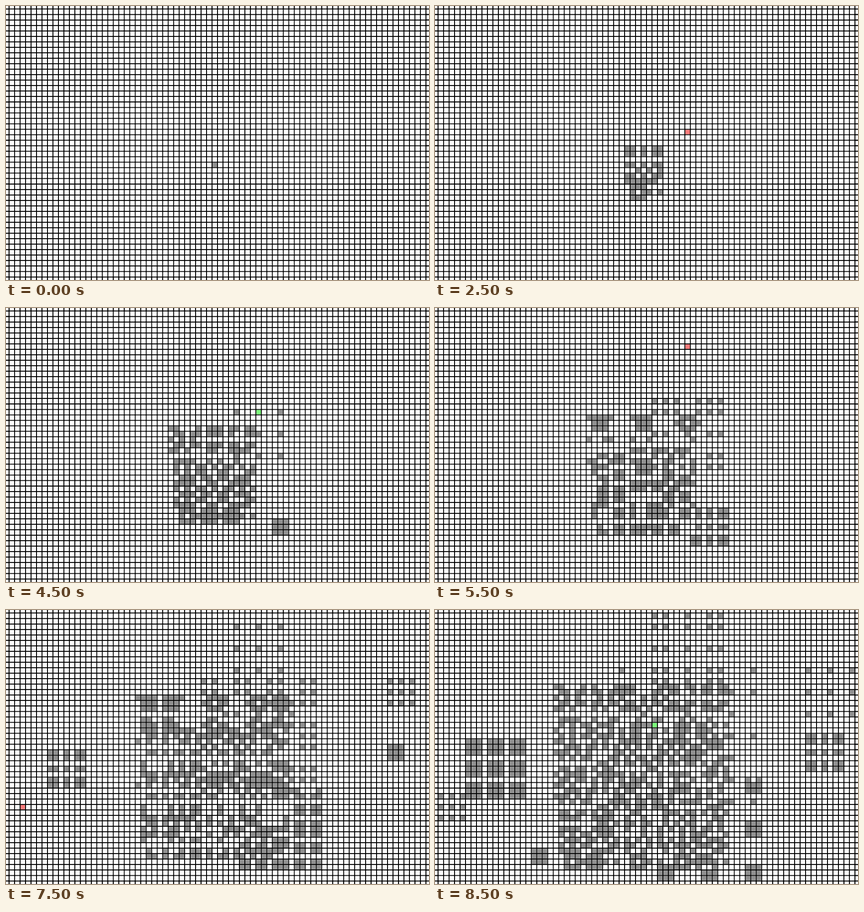
These frames come from a looping animation (928 by 603 pixels, 10000 ms). An HTML page:

```html
<!DOCTYPE html>
<html lang="en">
<head>
<meta charset="utf-8">
<title>Parity automaton with errors</title>
<style>
html, body { margin: 0; width: 100%; height: 100%; overflow: hidden; background: #fff; }
svg { display: block; width: 928px; height: 603px; }
</style>
</head>
<body>
<svg viewBox="0 0 928 603">
  <rect width="928" height="603" fill="#fff"/>
  <path id="lines" fill="none" stroke="#000" stroke-width="2.3"/>
  <path id="off" fill="#fff"/>
  <path id="on" fill="#919191"/>
  <path id="added" fill="#ff7a7a"/>
  <path id="removed" fill="#7aff7a"/>
</svg>
<script>
const W = 928, H = 603, COLS = 76, ROWS = 49;
const PITCH = 12.033, HALF_LINE = 1.13;
const LEFT = (W - COLS * PITCH) / 2, TOP = (H - ROWS * PITCH) / 2;
const LOOP = 10000, STEP = 500, LEAD = 1000;

// Column and row of the one cell flipped after each generation.
const flips = [
  [38, 31], [36, 33], [45, 22], [40, 30], [31, 23],
  [49, 39], [45, 18], [42, 36], [45, 6], [10, 28],
  [71, 14], [70, 25], [2, 35], [18, 44], [39, 20]
];

const index = (c, r) => r * COLS + c;
const lineX = c => LEFT + c * PITCH;
const lineY = r => TOP + r * PITCH;

// Each new cell is the parity of its 3 by 3 neighbourhood.
function evolve(cells) {
  const next = new Uint8Array(COLS * ROWS);
  for (let r = 0; r < ROWS; r++) {
    for (let c = 0; c < COLS; c++) {
      let sum = 0;
      for (let y = Math.max(0, r - 1); y <= Math.min(ROWS - 1, r + 1); y++) {
        for (let x = Math.max(0, c - 1); x <= Math.min(COLS - 1, c + 1); x++) {
          sum ^= cells[index(x, y)];
        }
      }
      next[index(c, r)] = sum;
    }
  }
  return next;
}

function cellPath(c, r) {
  const size = (PITCH - 2 * HALF_LINE).toFixed(3);
  const x = (lineX(c) + HALF_LINE).toFixed(3);
  const y = (lineY(r) + HALF_LINE).toFixed(3);
  return `M${x} ${y}h${size}v${size}h-${size}z`;
}

function toPaths(cells, flip) {
  const paths = { off: "", on: "", added: "", removed: "" };
  const marked = flip ? index(...flip) : -1;
  for (let r = 0; r < ROWS; r++) {
    for (let c = 0; c < COLS; c++) {
      const i = index(c, r);
      const kind = i === marked
        ? (cells[i] ? "added" : "removed")
        : (cells[i] ? "on" : "off");
      paths[kind] += cellPath(c, r);
    }
  }
  return paths;
}

function buildGenerations() {
  let cells = new Uint8Array(COLS * ROWS);
  cells[index(37, 28)] = 1;
  const list = [toPaths(cells)];
  for (const flip of flips) {
    cells = evolve(cells);
    cells[index(...flip)] ^= 1;
    list.push(toPaths(cells, flip));
  }
  return list;
}

function gridPath() {
  let d = "";
  for (let c = 0; c <= COLS; c++) d += `M${lineX(c).toFixed(3)} 0V${H}`;
  for (let r = 0; r <= ROWS; r++) d += `M0 ${lineY(r).toFixed(3)}H${W}`;
  return d;
}

const setPath = (id, d) => document.getElementById(id).setAttribute("d", d);
const generations = buildGenerations();
let shown = -1;

function draw(ms) {
  const n = Math.floor((ms % LOOP - LEAD) / STEP);
  const g = Math.min(flips.length, Math.max(0, n));
  if (g === shown) return;
  shown = g;
  for (const [id, d] of Object.entries(generations[g])) setPath(id, d);
}

setPath("lines", gridPath());
draw(0);
const start = performance.now();
function tick() {
  draw(performance.now() - start);
  requestAnimationFrame(tick);
}
requestAnimationFrame(tick);
</script>
</body>
</html>
```
